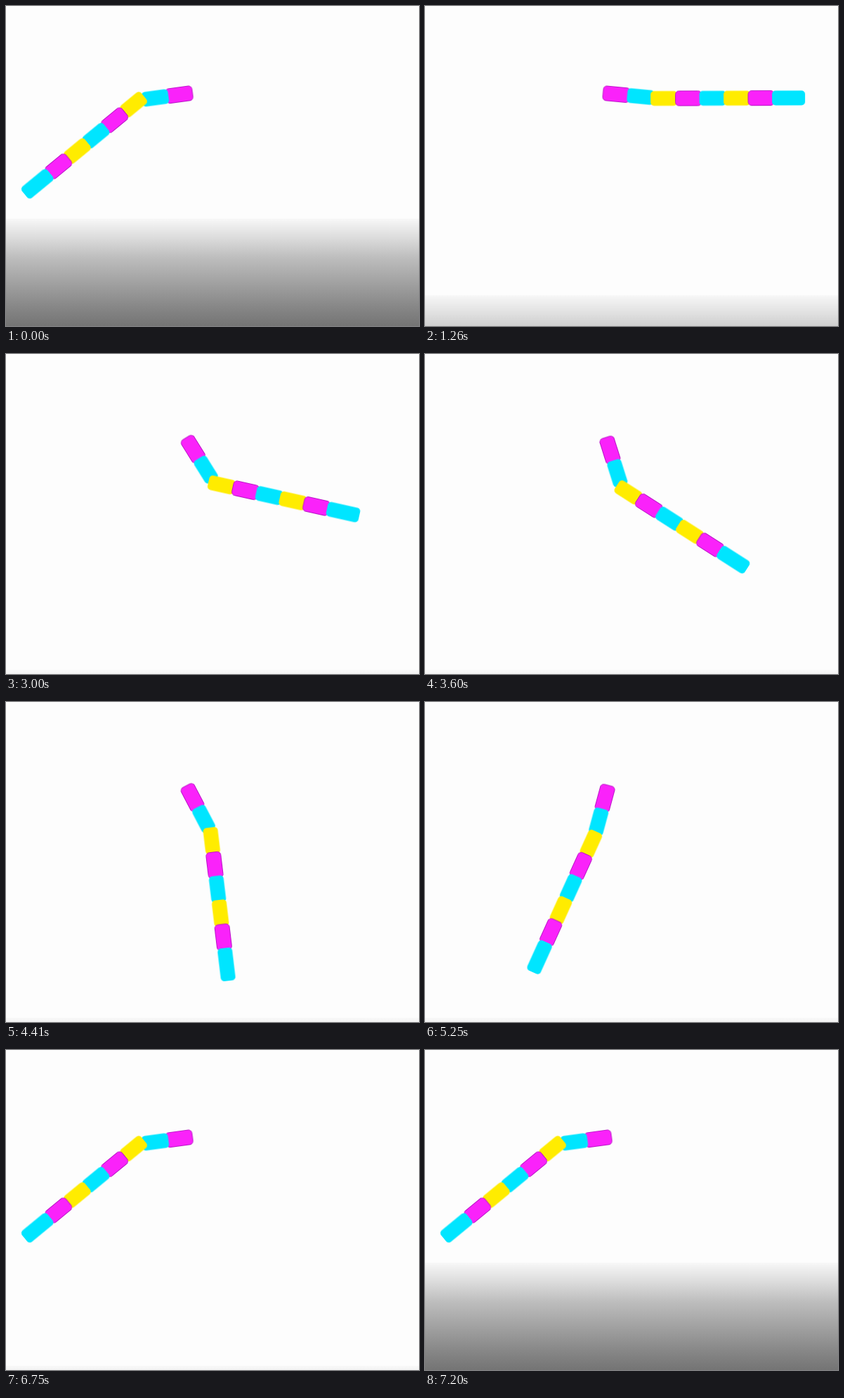
Recreate the animation shown at these times as an HTML page. Size 588x456 px, loop 7380 ms.

```html
<!DOCTYPE html>
<html lang="en">
<head>
<meta charset="utf-8">
<title>Swinging straw</title>
<style>
  html, body { margin: 0; width: 100%; height: 100%; overflow: hidden; background: #fdfdfd; }
  .stage { position: relative; width: 588px; height: 456px; overflow: hidden; }
  svg { position: absolute; inset: 0; }

  .shade {
    position: absolute; left: 0; top: 303px; width: 588px; height: 153px;
    background: linear-gradient(#f8f8f8, #efefef 8px, #dbdbdb 28px, #bdbdbd 56px, #9d9d9d 97px, #868686 127px, #747474);
    animation: shade 7380ms linear infinite;
  }
  .straw { animation: blink 7380ms step-end infinite; }
  .upper { animation: upper 7380ms linear infinite; }
  .lower { animation: lower 7380ms linear infinite; }

  rect { height: 21px; y: -10.5px; rx: 5px; }
  .c { fill: #00e5ff; }
  .y { fill: #ffec00; }
  .m { fill: #fa22fa; stroke: #b915c6; stroke-width: 1; }

  @keyframes shade {
    0%, 14.2% { transform: none; opacity: 1; animation-timing-function: cubic-bezier(.22, .5, .45, .95); }
    20.732%, 93.4% { transform: translateY(147px); opacity: .85; animation-timing-function: ease-out; }
    97.561%, 100% { transform: none; opacity: 1; }
  }
  @keyframes blink {
    0% { visibility: visible; }
    12.195% { visibility: hidden; }
    14.634%, 100% { visibility: visible; }
  }
  /* angle of the short arm */
  @keyframes upper {
    0% { transform: rotate(172.2deg); animation-timing-function: step-end; }
    14.634%, 25.203% { transform: rotate(5.5deg); }
    26.829% { transform: rotate(12deg); }
    32.114% { transform: rotate(32deg); }
    35.23% { transform: rotate(43deg); }
    39.024% { transform: rotate(54.5deg); }
    44.038% { transform: rotate(65.5deg); }
    48.78% { transform: rotate(72.5deg); }
    50% { transform: rotate(73.5deg); }
    54.878% { transform: rotate(70.5deg); }
    59.756% { transform: rotate(62.4deg); }
    60.976% { transform: rotate(63.5deg); }
    65.041% { transform: rotate(76deg); }
    70.732% { transform: rotate(103deg); }
    75.339% { transform: rotate(126deg); }
    80.488% { transform: rotate(150deg); }
    82.927% { transform: rotate(159.1deg); }
    86.721% { transform: rotate(166.5deg); }
    91.463%, 100% { transform: rotate(172.2deg); }
  }
  /* bend of the long arm relative to the short one */
  @keyframes lower {
    0% { transform: rotate(-31.7deg); animation-timing-function: step-end; }
    14.634%, 25.203% { transform: rotate(-5.7deg); }
    26.829% { transform: rotate(-12deg); }
    32.114% { transform: rotate(-31.5deg); }
    35.23% { transform: rotate(-40deg); }
    39.024% { transform: rotate(-45deg); }
    44.038% { transform: rotate(-46.5deg); }
    48.78% { transform: rotate(-39.9deg); }
    50% { transform: rotate(-36.5deg); }
    54.878% { transform: rotate(-10.5deg); }
    59.756% { transform: rotate(20.7deg); }
    60.976% { transform: rotate(24.5deg); }
    65.041% { transform: rotate(26deg); }
    70.732% { transform: rotate(11deg); }
    75.339% { transform: rotate(-8deg); }
    80.488% { transform: rotate(-26.4deg); }
    82.927% { transform: rotate(-32.4deg); }
    86.721% { transform: rotate(-32.5deg); }
    91.463%, 100% { transform: rotate(-31.7deg); }
  }
</style>
</head>
<body>
<div class="stage">
  <div class="shade"></div>
  <svg width="588" height="456" viewBox="0 0 588 456">
    <g class="straw" transform="translate(259.5 124.5)">
      <g class="upper">
        <rect class="m" x="-6" width="38"/>
        <rect class="c" x="28.5" width="38"/>
        <!-- the hinge sits inside the first yellow band -->
        <g transform="translate(70 .5)">
          <g class="lower">
            <rect class="y" x="-8" width="38"/>
            <rect class="m" x="27.5" width="37"/>
            <rect class="c" x="61.5" width="38"/>
            <rect class="y" x="96" width="38"/>
            <rect class="m" x="131" width="37"/>
            <rect class="c" x="165" width="47"/>
          </g>
        </g>
      </g>
    </g>
  </svg>
</div>
</body>
</html>
```
